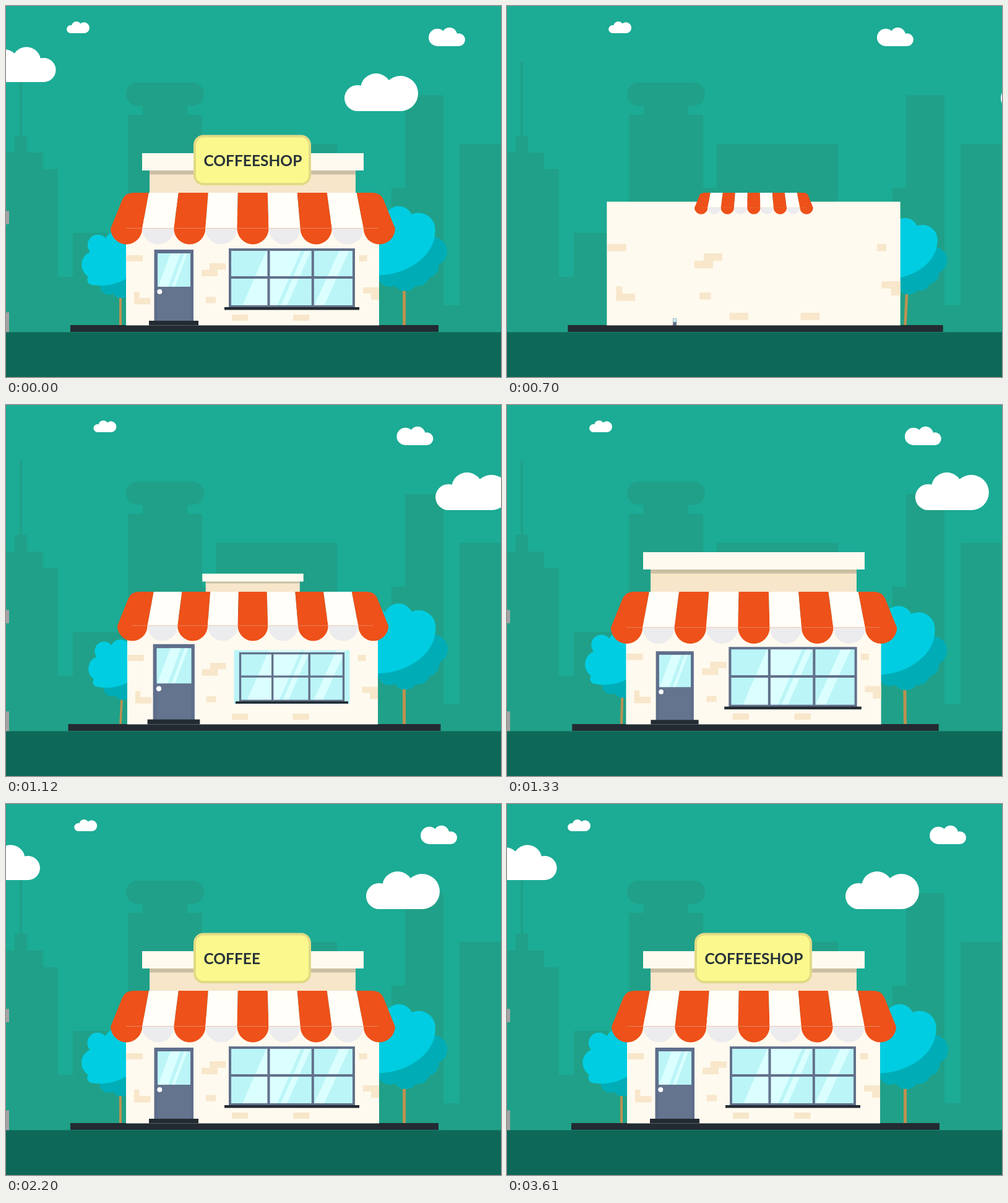
Animation, 800 px wide and 600 px high, one loop 3.88 s. Source, as an HTML page:

```html
<!DOCTYPE html>
<html lang="en">
<head>
<meta charset="utf-8">
<title>Coffee shop</title>
<style>
  html, body { margin: 0; width: 100%; height: 100%; overflow: hidden; background: #1cab95; }
  svg { display: block; width: 800px; height: 600px; }
  text { font: bold 24.5px Lato, sans-serif; fill: #27323a; }
</style>
</head>
<body>
<svg viewBox="0 0 800 600">
  <defs>
    <g id="cloud" fill="#fff">
      <circle cx="21" cy="-21" r="21"/><circle cx="51" cy="-36" r="25"/><circle cx="90.5" cy="-28.5" r="28.5"/>
      <path d="M21 0V-30H90V0z"/>
    </g>
    <g id="tree">
      <path d="M-2.5 0V-70H2.5V0z" fill="#bc9150"/>
      <g fill="#00adb7">
        <circle cx="46" cy="-119" r="23.5"/><circle cx="36" cy="-96" r="20"/><circle cx="22" cy="-82" r="19"/>
        <circle cx="2" cy="-76" r="21"/><circle cx="-24" cy="-80" r="18"/><circle cx="0" cy="-110" r="40"/>
      </g>
      <path fill="#00cde1" d="M-57-82C-10-74 50-105 50-152A27 27 0 0 0 12-179A23 23 0 0 0-30-178A21 21 0 0 0-62-150A29 29 0 0 0-66-99A11 11 0 0 0-57-82z"/>
    </g>
    <clipPath id="doorGlass"><path d="M245 400H298V454H245z"/></clipPath>
    <clipPath id="windowGlass"><path d="M361 393H563V487H361z"/></clipPath>
  </defs>

  <path fill="#1cab95" d="M0 0H800V600H0z"/>
  <g fill="#20a088">
    <rect x="194" y="124" width="126" height="37.5" rx="18.5"/>
    <path d="M0 528V237H14V210H22V90H26V210H34V237H60V264H84V438H108V367H197V176H221V155H293V176H317V294H339V223H535V438H623V294H645V144H707V484H733V223H800V528z"/>
  </g>
  <path id="posts" fill="#a3a3a3" d="M0 331.500H5V353H0zM0 495.500H5V528H0z"/>
  <g id="clouds"></g>
  <path fill="#0e6858" d="M0 527.500H800V600H0z"/>
  <use href="#tree" id="treeLeft"/>
  <use href="#tree" id="treeRight"/>
  <path id="base" fill="#232b32" d="M104 516H699V527H104z"/>

  <g id="wall">
    <path fill="#fffaef" d="M194 344H603V516.500H194z"/>
    <path id="bricks" fill="#f8e7cb"/>
  </g>
  <g id="roof">
    <path fill="#f7e6ca" d="M232 266H565V303H232z"/>
    <path fill="#cbbfa3" d="M232 266H565V272.500H232z"/>
    <path fill="#fffaf0" d="M220 238H578V266H220z"/>
  </g>
  <g id="awning"></g>
  <g id="door">
    <path fill="#5f6e8b" d="M239.500 394H303V510H239.500z"/>
    <path fill="#64748f" d="M245 454H298V510H245z"/>
    <path fill="#bbf5f7" d="M245 400H298V454H245z"/>
    <path fill="#dbffff" clip-path="url(#doorGlass)" d="M266 400H282L262 454H246zM288 400H293L273 454H268z"/>
    <circle cx="248.300" cy="462" r="4" fill="#fff"/>
    <path fill="#232b32" d="M231 509H311V516.500H231z"/>
  </g>
  <g id="glass">
    <path fill="#bbf5f7" d="M361 393H563V487H361z"/>
    <path fill="#dbffff" clip-path="url(#windowGlass)" d="M422 393H478L437 487H381zM484 393H494L453 487H443zM540 393H556L513 487H497z"/>
  </g>
  <g id="frame">
    <path fill="none" stroke="#62718b" stroke-width="4" d="M362 394H562V486H362zM424.500 394V486M495.800 394V486M362 439H562"/>
    <path fill="#232b32" d="M353 487H571V491.500H353z"/>
  </g>
  <path id="signFill" fill="#fbf98d"/>
  <path id="signEdge" fill="none" stroke="#e2da85" stroke-width="4"
    d="M392 210.500H477A14 14 0 0 1 491 224.500V274A14 14 0 0 1 477 288H319A14 14 0 0 1 305 274V224.500A14 14 0 0 1 319 210.500z"/>
  <text id="label" x="319.500" y="259"></text>
</svg>
<script>
const LOOP = 3880, END = 3610, STEP = 30, LEAD = 100;
const $ = id => document.getElementById(id);
const clamp = v => Math.min(1, Math.max(0, v));

// x, y, width, height
$('bricks').setAttribute('d', [
  [195, 403, 26, 10], [329, 416, 26, 10.5], [316, 426.5, 26, 10.5], [570.5, 403, 13, 10], [323, 470.5, 16, 10],
  [207, 462, 8.500, 11], [207, 472, 26.5, 10.5], [577, 455, 26, 10], [590, 465, 13, 10], [365, 499, 26, 10], [464, 499, 26.5, 10]
].map(([x, y, w, h]) => `M${x} ${y}h${w}v${h}h${-w}z`).join(''));

// Awning stripes, narrower at the top, each ending in a round scallop
let stripes = '';
for (let i = 0; i < 9; i++) {
  const top = n => 398.8 + 48 * (n - 4.5), low = n => 399 + 51.1 * (n - 4.5);
  const left = i ? `L${top(i)} 302` : 'L188 313Q193 302 206 302';
  const right = i < 8 ? `L${top(i + 1)} 302` : 'L592 302Q605 302 610 313';
  const odd = i % 2;
  stripes += `<path fill="${odd ? '#fffef8' : '#ee5119'}" d="M${low(i)} 360${left}${right}L${low(i + 1)} 360z"/>
    <path fill="${odd ? '#ececee' : '#ee5119'}" d="M${low(i)} 359.500H${low(i + 1)}A25.550 26 0 0 1 ${low(i)} 359.500z"/>`;
}
$('awning').innerHTML = stripes + '<path d="M194 359.500H603" stroke="#e9a58a" opacity=".6"/>';

// End position, scale (negative width mirrors), and drift still to travel
const clouds = [
  { x: 98, y: 44, sx: .31, s: .31, slow: 75, fast: 45 },
  { x: 742, y: 65, sx: -.495, s: .495, slow: -78, fast: -97 },
  { x: 547, y: 170, sx: 1, s: 1, slow: 208, fast: 333 },
  { x: 80.5, y: 123, sx: -.93, s: .93, slow: -145, fast: -512 }
];
$('clouds').innerHTML = '<use href="#cloud"/>'.repeat(clouds.length);

// Grows evenly until `end`, then rings out around full size
function spring(t, end, rise, amp = .33, freq = 2) {
  const s = (t - end) / 1000;
  return s < 0 ? clamp(1 + s * 1000 / rise) : 1 + amp * Math.sin(2 * Math.PI * freq * s) * Math.exp(-5 * s);
}

function scale(id, x, y, sx, sy = sx) {
  $(id).setAttribute('transform', `translate(${x} ${y}) scale(${sx} ${sy}) translate(${-x} ${-y})`);
}

function growTree(id, x, size, t, end) {
  const s = Math.max(0, (t - end) / 1000);
  const lean = 3 * Math.cos(3.93 * s) * Math.exp(-2 * s);
  $(id).setAttribute('transform',
    `translate(${x} 516) rotate(${lean}) scale(${size * spring(t, end, 200, .117, 3)})`);
}

const edge = $('signEdge'), edgeLength = edge.getTotalLength();
function drawSign(t) {
  const fill = clamp((t - 1350) / 390), line = clamp((t - 1450) / 400);
  let d = '';
  for (let i = 0; i <= 120; i++) {
    const p = edge.getPointAtLength(edgeLength * fill * i / 120);
    d += `${i ? 'L' : 'M'}${p.x} ${p.y}`;
  }
  $('signFill').setAttribute('d', d + 'z');
  edge.setAttribute('stroke-dasharray', line < 1 ? `${edgeLength * line} ${edgeLength}` : 'none');
  edge.setAttribute('visibility', line ? 'visible' : 'hidden');
  $('label').textContent = 'COFFEESHOP'.slice(0, Math.max(0, Math.floor((t - 1800) / 60)));
}

function draw(time) {
  // The finished shop holds briefly before the scene restarts
  const t = time < LEAD ? END : Math.min(END, LEAD + Math.floor((time - LEAD) / STEP) * STEP);
  const u = (END - t) / (END - LEAD);
  clouds.forEach((c, i) => {
    const x = c.x + u ** 2 * (c.slow + c.fast * u ** 4);
    $('clouds').children[i].setAttribute('transform', `translate(${x} ${c.y}) scale(${c.sx} ${c.s})`);
  });
  $('posts').setAttribute('visibility', t < 900 ? 'hidden' : 'visible');
  growTree('treeRight', 643.5, 1, t, 720);
  growTree('treeLeft', 185, .79, t, 1140);
  scale('base', 401.5, 516, spring(t, 465, 300), 1);
  scale('wall', 398.5, 516.5, spring(t, 645, 300));
  scale('awning', 398.8, 302, spring(t, 812, 192));
  scale('door', 271, 516.5, spring(t, 912, 233));
  scale('glass', 462, 440, spring(t, 1135, 200, .05));
  scale('frame', 462, 440, spring(t, 1153, 200, .05));
  scale('roof', 399, 302, spring(t, 1283, 300, 0));
  drawSign(t);
}

(function tick() {
  draw(performance.now() % LOOP);
  requestAnimationFrame(tick);
})();
</script>
</body>
</html>
```
